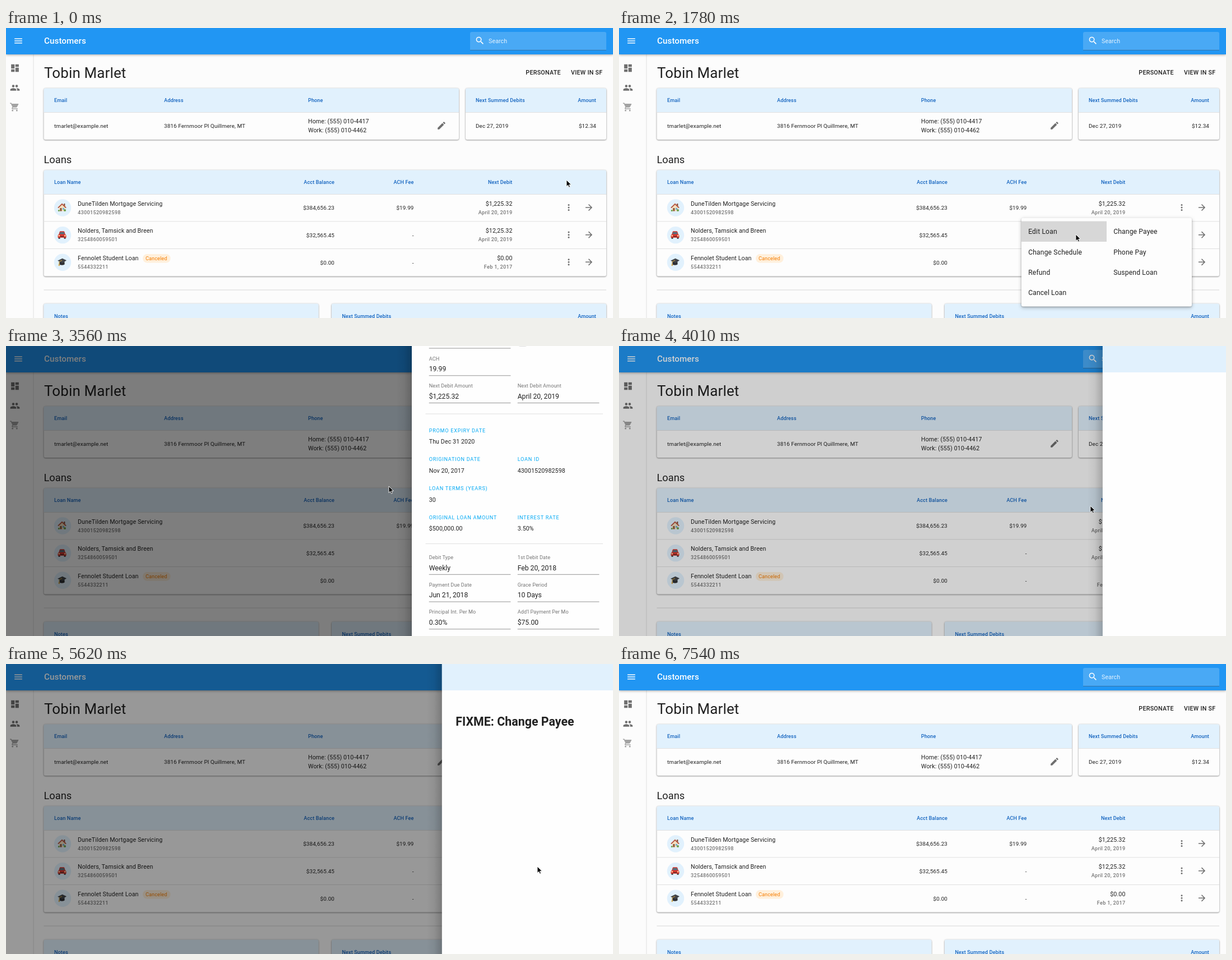
These frames come from a looping animation (1083 by 517 pixels, 7.96 s). An HTML page:

```html
<!DOCTYPE html>
<html lang="en">
<head>
<meta charset="utf-8">
<title>Customers</title>
<style>
html, body { margin: 0; width: 100%; height: 100%; overflow: hidden; background: #fcfcfc; }
svg { display: block; width: 1083px; height: 517px; font-family: Roboto, Arial, sans-serif; }
text { fill: #212121; white-space: pre; }
.title { font-size: 25.84px; letter-spacing: .00735em; }
.section { font-size: 18.24px; }
.bar { font-size: 15.2px; font-weight: 500; letter-spacing: .005em; fill: #fff; }
.search { font-size: 10.64px; letter-spacing: .0094em; fill: #e6f3fe; }
.button { font-size: 10.64px; font-weight: 500; letter-spacing: .02857em; }
.head { font-size: 9.12px; font-weight: 500; letter-spacing: .0107em; fill: #1565c0; }
.cell { font-size: 9.88px; letter-spacing: .012em; }
.body { font-size: 10.64px; letter-spacing: .0107em; }
.note { font-size: 9.12px; font-weight: 500; letter-spacing: .0333em; fill: #757575; }
.chip { font-size: 9.12px; letter-spacing: .0107em; fill: #f57c00; }
.item { font-size: 12.16px; letter-spacing: .0107em; }
.label { font-size: 9.12px; letter-spacing: .0094em; fill: #757575; }
.value { font-size: 12.16px; }
.over { font-size: 9.12px; letter-spacing: .0833em; fill: #03a9f4; }
.payee { font-size: 21.3px; font-weight: 700; letter-spacing: .05px; }
.card { fill: #fdfdfd; filter: drop-shadow(0 1px 1px rgba(0,0,0,.32)) drop-shadow(0 0 1px rgba(0,0,0,.22)); }
.topbar { fill: #2196f3; filter: drop-shadow(0 1px 2px rgba(0,0,0,.35)); }
.popup { fill: #fdfdfd; filter: drop-shadow(0 1px 1px rgba(0,0,0,.25)) drop-shadow(0 2px 3px rgba(0,0,0,.25)); }
</style>
</head>
<body>
<svg id="stage" viewBox="0 0 1083 517"></svg>
<script>
const LOOP = 7960, STEP = 147.9, W = 1083, H = 517;
const PALE = '#e1f1fd', GRAY = '#6f6f6f', LINE = '#e0e0e0';
const DRAWER_X = 724, DRAWER_W = W - DRAWER_X, SCROLL_END = 118;

const SIZE = { title: 25.84, section: 18.24, bar: 15.2, search: 10.64, button: 10.64, head: 9.12, cell: 9.88,
  body: 10.64, note: 9.12, chip: 9.12, item: 12.16, label: 9.12, value: 12.16, over: 9.12, payee: 21.3 };

const ICON = {
  menu: 'M3 18h18v-2H3zM3 13h18v-2H3zM3 6v2h18V6z',
  board: 'M3 13h8V3H3zM3 21h8v-6H3zM13 21h8V11h-8zM13 3v6h8V3z',
  people: 'M16 11a3 3 0 1 0 0-6 3 3 0 0 0 0 6zM8 11a3 3 0 1 0 0-6 3 3 0 0 0 0 6zM8 13c-2.33 0-7 1.17-7 3.5V19h14v-2.5C15 14.17 10.33 13 8 13zM16 13l-.97.05C16.19 13.9 17 15 17 16.5V19h6v-2.5c0-2.33-4.67-3.5-7-3.5z',
  cart: 'M7 18a2 2 0 1 0 0 4 2 2 0 0 0 0-4zM17 18a2 2 0 1 0 0 4 2 2 0 0 0 0-4zM1 2v2h2l3.6 7.6-1.35 2.4C4.5 15.4 5.5 17 7 17h12v-2H7.4c-.2 0-.3-.2-.2-.4L8.1 13h7.45c.75 0 1.4-.4 1.75-1l3.6-6.5C21.2 4.8 20.8 4 20 4H5.2l-.94-2z',
  search: 'M15.5 14h-.8l-.27-.27a6.5 6.5 0 1 0-.7.7l.27.28v.79l5 5 1.5-1.5zM9.5 14a4.5 4.5 0 1 1 0-9 4.5 4.5 0 0 1 0 9z',
  edit: 'M3 17.25V21h3.75L17.81 9.94l-3.75-3.75zM20.71 7.04a1 1 0 0 0 0-1.41l-2.34-2.34a1 1 0 0 0-1.41 0l-1.83 1.83 3.75 3.75z',
  more: 'M12 8a2 2 0 1 0 0-4 2 2 0 0 0 0 4zM12 10a2 2 0 1 0 0 4 2 2 0 0 0 0-4zM12 16a2 2 0 1 0 0 4 2 2 0 0 0 0-4z',
  arrow: 'M12 4l-1.41 1.41L16.17 11H4v2h12.17l-5.58 5.59L12 20l8-8z'
};

// y is the middle of the capital letters
const text = (kind, x, y, str, anchor = 'start') =>
  `<text class="${kind}" x="${x}" y="${(y + SIZE[kind] * .355).toFixed(2)}" text-anchor="${anchor}">${str}</text>`;
const right = (kind, x, y, str) => text(kind, x, y, str, 'end');
const rect = (x, y, w, h, fill, more = '') =>
  `<rect x="${x}" y="${y}" width="${w}" height="${h}" fill="${fill}" ${more}/>`;
const icon = (name, x, y, fill = GRAY) =>
  `<path transform="translate(${x} ${y}) scale(.76) translate(-12 -12)" d="${ICON[name]}" fill="${fill}" fill-rule="evenodd"/>`;
const group = (id, inner) => `<g id="${id}">${inner}</g>`;

const card = (x, y, w, h, head) =>
  `<rect class="card" x="${x}" y="${y}" width="${w}" height="${h}" rx="3"/>` +
  `<path d="M${x} ${y + head}v${3 - head}q0-3 3-3h${w - 6}q3 0 3 3v${head - 3}z" fill="${PALE}"/>` +
  rect(x, y + head - .5, w, 1, LINE);

const house = `<path d="M3 -7h2.4v5H3z" fill="#8d5a45"/><path d="M-5.5 -1L0 -6l5.5 5v7.5h-11z" fill="#f3dfbf"/>
  <path d="M-7.8 0L0 -7.5 7.8 0l-1.3 1.2L0 -5l-6.5 6.2z" fill="#b5533f"/><path d="M-3.6 1h3v5.5h-3z" fill="#8a5436"/>
  <path d="M1 .8h3v3H1z" fill="#6eb0d8"/><circle cx="5" cy="5" r="2" fill="#68a04a"/><circle cx="-5.7" cy="5.4" r="1.5" fill="#68a04a"/>`;
const car = `<path d="M-6.5 3h3v4h-3zM3.5 3h3v4h-3z" fill="#333"/><path d="M-5.8 -1l1.5-4.5q.4-1 1.4-1h5.8q1 0 1.4 1L5.8 -1q1.7 1 1.7 2.8V5h-15V1.8Q-7.5 0-5.8 -1z" fill="#d8342c"/>
  <path d="M-4.6 -1.2l1.2-3.6h6.8l1.2 3.6z" fill="#54707f"/><path d="M-3 2.4h6v1.5h-6z" fill="#55302c"/>
  <circle cx="-5.2" cy="1.6" r="1.2" fill="#ffe9b0"/><circle cx="5.2" cy="1.6" r="1.2" fill="#ffe9b0"/>`;
const cap = `<path d="M-4.5 -1.5l9 1.5v4.2q-4.5 2.6-9 .2z" fill="#2d2f33"/><path d="M-8 -2.5L0.5 -6.5 8 -3l-7 4.8z" fill="#414449"/>
  <path d="M0 -3.2L-5.2 -.6v5" fill="none" stroke="#d0a13c" stroke-width="1"/><path d="M-6.2 3.6h2v3.2h-2z" fill="#d0a13c"/>`;

function loanRow(i, art, name, number, balance, fee, debit, date) {
  const y = 320.5 + i * 48.65;
  return `<circle cx="101" cy="${y}" r="15.2" fill="${PALE}"/><g transform="translate(100 ${y - .5})">${art}</g>` +
    text('body', 128, y - 7.7, name) + text('note', 128, y + 7.9, number) +
    right('cell', 586, y + .2, balance) + right('cell', 727.5, y + .2, fee) +
    right('body', 903.5, y - 7.7, debit) + right('note', 903.5, y + 7.9, date) +
    icon('more', 1004, y - .5) + icon('arrow', 1040, y - .5) +
    (i ? rect(67, y - 24.8, 1004, 1, LINE) : '');
}

const page = rect(0, 0, W, H, '#fcfcfc') + rect(48.5, 47, 1, 470, LINE) +
  `<rect class="topbar" width="${W}" height="47"/>` +
  icon('menu', 22, 23, '#fff') + text('bar', 68, 23, 'Customers') +
  `<path d="M828 40V10q0-3 3-3h237q3 0 3 3v30z" fill="#fff" fill-opacity=".18"/>` +
  rect(828, 39, 243, 1, '#000', 'opacity=".3"') +
  icon('search', 845.5, 22.5, '#fff') + text('search', 861, 23, 'Search') +
  icon('board', 16, 71.5) + icon('people', 16, 106.5) + icon('cart', 15.5, 141, '#a3a3a3') +
  text('title', 68, 80, 'Tobin Marlet') +
  text('button', 927.3, 79.5, 'PERSONATE') + text('button', 1008, 79.5, 'VIEW IN SF') +
  card(67.5, 107.5, 740.5, 91.5, 43) +
  text('head', 86, 128.5, 'Email') + text('head', 282, 128.5, 'Address') + text('head', 539, 128.5, 'Phone') +
  text('cell', 86, 174.7, 'tmarlet@example.net') +
  text('cell', 282, 174.7, '3816 Fernmoor Pl Quillmere, MT') +
  text('body', 539, 166.3, 'Home: (555) 010-4417') + text('body', 539, 182.3, 'Work: (555) 010-4462') +
  icon('edit', 777, 174) +
  card(820, 107.5, 251, 91.5, 43) +
  text('head', 838, 128.5, 'Next Summed Debits') + right('head', 1053, 128.5, 'Amount') +
  text('cell', 838, 174.7, 'Dec 27, 2019') + right('cell', 1053, 174.7, '$12.34') +
  text('section', 67.5, 235, 'Loans') +
  card(67.5, 253.5, 1003.5, 189, 43) +
  text('head', 86, 274.5, 'Loan Name') + right('head', 586, 274.5, 'Acct Balance') +
  right('head', 727.5, 274.5, 'ACH Fee') + right('head', 903.5, 274.5, 'Next Debit') +
  loanRow(0, house, 'DuneTilden Mortgage Servicing', '43001520982598', '$384,656.23', '$19.99', '$1,225.32', 'April 20, 2019') +
  loanRow(1, car, 'Nolders, Tamsick and Breen', '3254860059501', '$32,565.45', '-', '$12,25.32', 'April 20, 2019') +
  loanRow(2, cap, 'Fennolet Student Loan', '5544332211', '$0.00', '-', '$0.00', 'Feb 1, 2017') +
  rect(244, 403, 49.5, 15.5, '#fff0dc', 'rx="7.7"') + text('chip', 249, 411, 'Canceled') +
  rect(67.5, 466.5, 1003.5, 1, '#d8d8d8') +
  card(67.5, 491.5, 490, 90, 43) + text('head', 86, 513.3, 'Notes') +
  card(581, 491.5, 490, 90, 43) + text('head', 599.5, 513.3, 'Next Summed Debits') + right('head', 1053, 513.3, 'Amount');

const items = [['Edit Loan', 'Change Payee'], ['Change Schedule', 'Phone Pay'], ['Refund', 'Suspend Loan'], ['Cancel Loan', '']];
const menu = '<rect class="popup" x="718" y="338.5" width="304" height="158" rx="3"/>' +
  rect(718, 344.5, 152, 36.5, '#000', 'id="hover"') +
  items.map((row, r) => row.map((s, c) => text('item', 730.2 + c * 152, 362.8 + r * 36.4, s)).join('')).join('');

const left = 754.7, mid = 912.7;
const field = (x, y, label, value) =>
  text('label', x, y, label) + text('value', x, y + 18.6, value) + rect(x, y + 30, 145.7, 1, '#949494');
const fact = (x, y, label, value) => text('over', x, y, label) + text('body', x, y + 20, value);
const rule = y => rect(748.5, y, 316.5, 1, LINE);
const form = field(left, -26.5, 'Acct Balance', '$384,656.23') +
  rect(mid, -8, 18, 8.8, '#d5d5d5', 'rx="4.4"') +
  field(left, 22.3, 'ACH', '19.99') +
  field(left, 71, 'Next Debit Amount', '$1,225.32') + field(mid, 71, 'Next Debit Amount', 'April 20, 2019') + rule(120.5) +
  fact(left, 150.5, 'PROMO EXPIRY DATE', 'Thu Dec 31 2020') +
  fact(left, 202.2, 'ORIGINATION DATE', 'Nov 20, 2017') + fact(mid, 202.2, 'LOAN ID', '43001520982598') +
  fact(left, 254, 'LOAN TERMS (YEARS)', '30') +
  fact(left, 305.7, 'ORIGINAL LOAN AMOUNT', '$500,000.00') + fact(mid, 305.7, 'INTEREST RATE', '3.50%') + rule(352) +
  field(left, 376.8, 'Debit Type', 'Weekly') + field(mid, 376.8, '1st Debit Date', 'Feb 20, 2018') +
  field(left, 425.5, 'Payment Due Date', 'Jun 21, 2018') + field(mid, 425.5, 'Grace Period', '10 Days') +
  field(left, 474.2, 'Principal Int. Per Mo', '0.30%') + field(mid, 474.2, 'Add\'l Payment Per Mo', '$75.00');

const drawer = rect(DRAWER_X - 28, 0, 28, H, 'url(#edge)') + rect(DRAWER_X, 0, DRAWER_W, H, '#fefefe') +
  group('sheet', rect(DRAWER_X, 0, DRAWER_W, 47, PALE) +
    `<g id="form" transform="translate(0 ${SCROLL_END})">${form}</g>`) +
  group('payee', text('payee', 748.5, 102, 'FIXME: Change Payee')) +
  rect(1081.5, 0, 1.5, 421, '#8a8a8a', 'id="thumb"');

const pointer = '<path d="M0 0v11.6l2.7-2.5 1.8 4.1 2-.9-1.8-4h3.7z" fill="#000" stroke="#fff" stroke-width=".9" stroke-linejoin="round"/>';

document.getElementById('stage').innerHTML =
  '<defs><linearGradient id="edge"><stop offset="0" stop-opacity="0"/><stop offset=".5" stop-opacity=".05"/>' +
  '<stop offset="1" stop-opacity=".2"/></linearGradient></defs>' +
  page + '<circle id="halo" cx="1004" cy="320" r="18" opacity=".08"/>' + group('menu', menu) +
  rect(0, 0, W, H, '#000', 'id="dim"') + group('drawer', drawer) + group('cursor', pointer);

// Tracks: [tick, values...], linear between points
const CURSOR = [[1, 1000, 271], [2, 1002, 292], [3, 1004, 316], [6, 1004, 316], [7, 992, 322], [10, 815, 368],
  [13, 815, 368], [16, 801, 234], [22, 801, 234], [24, 683, 250], [26, 683, 250], [27, 841, 285], [30, 1004, 317],
  [34, 1004, 317], [37, 948, 361], [38, 948, 361], [40, 921, 330], [42, 921, 330], [44, 629, 317], [46, 629, 317],
  [51, 760, -20]];
const PANEL = [[12, 0, 0], [13, .6, .2], [14, 1, .5], [26, 1, .5], [27, .613, .18], [28, 0, 0],
  [37, 0, 0], [38, .85, .4], [39, 1, .5], [46, 1, .5], [47, .55, .17], [48, 0, 0]];
const MENU = [[5, 0], [6, .6], [7, 1], [12, 1], [13, 0], [32, 0], [33, .6], [34, 1], [37, 1], [38, 0]];
const SCROLL = [[14, 0], [15, 22], [16, 72], [17, 108], [18, SCROLL_END]];

function at(track, k) {
  const i = track.findIndex(p => p[0] >= k);
  if (i < 0) return track[track.length - 1].slice(1);
  if (i === 0) return track[0].slice(1);
  const a = track[i - 1], b = track[i], u = (k - a[0]) / (b[0] - a[0]);
  return a.slice(1).map((v, j) => v + (b[j + 1] - v) * u);
}

const el = id => document.getElementById(id);
const show = (id, on) => el(id).setAttribute('visibility', on ? 'inherit' : 'hidden');
const move = (id, x, y) => el(id).setAttribute('transform', `translate(${x} ${y})`);

function draw(time) {
  const k = Math.floor((time % LOOP + 8) / STEP);
  const [x, y] = at(CURSOR, k), [open, dim] = at(PANEL, k), [grow] = at(MENU, k), [top] = at(SCROLL, k);

  move('cursor', x, y);
  show('halo', k === 3 || k === 30);

  const sx = .75 + .25 * grow;
  show('menu', grow > 0);
  el('menu').setAttribute('opacity', grow);
  el('menu').setAttribute('transform', `translate(1022 338.5) scale(${sx} ${sx * sx}) translate(-1022 -338.5)`);
  const over = grow === 1 && x > 718 && x < 1022 && y > 344 && y < 381;
  el('hover').setAttribute('x', x < 870 ? 718 : 870);
  el('hover').setAttribute('opacity', !over ? 0 : k === 12 || k === 37 ? .15 : .08);

  const editing = k < 27;
  el('dim').setAttribute('opacity', dim);
  show('drawer', open > 0);
  move('drawer', (1 - open) * DRAWER_W, 0);
  move('sheet', 0, editing ? -top : 0);
  show('form', editing);
  show('payee', k >= 38 && k < 47);
  show('thumb', k >= 15 && k < 20);
  el('thumb').setAttribute('y', top * 96 / SCROLL_END);
}

let start;
function frame(now) {
  start ??= now;
  draw(now - start);
  requestAnimationFrame(frame);
}
draw(0);
requestAnimationFrame(frame);
</script>
</body>
</html>
```
